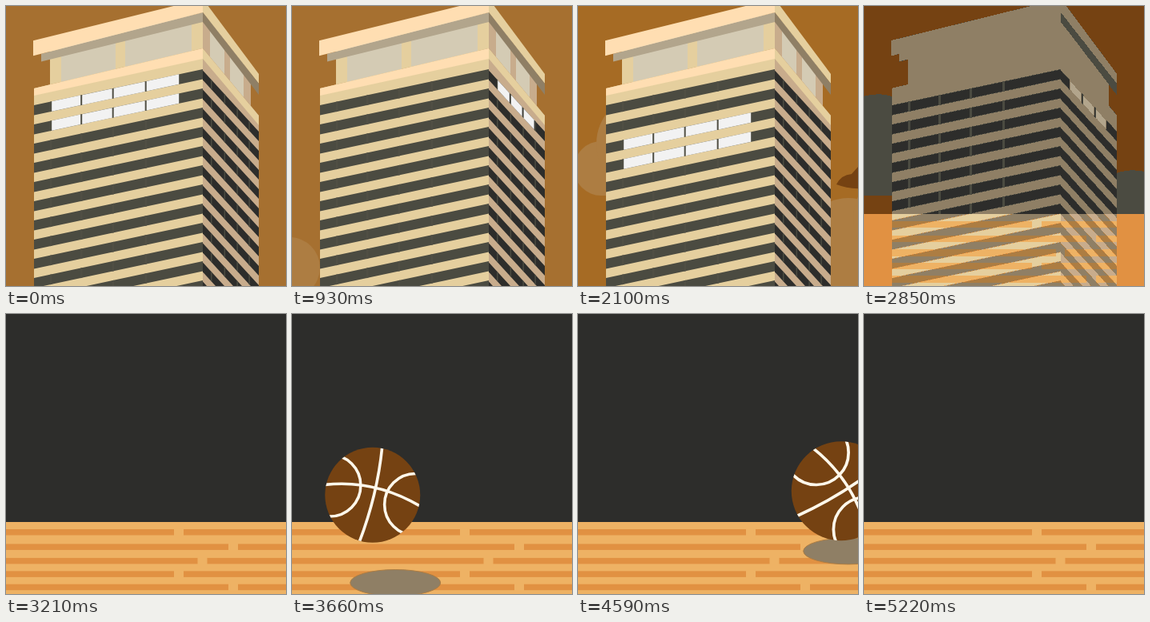
Animation of 350 by 350 pixels, one loop 5.37 s. Source, as an HTML page with a canvas:

```html
<!DOCTYPE html>
<html lang="en">
<head>
<meta charset="utf-8">
<title>Tower and ball</title>
<style>
html, body { margin: 0; width: 100%; height: 100%; overflow: hidden; background: #2d2d2b; }
canvas { display: block; width: 100vw; height: 100vh; }
</style>
</head>
<body>
<canvas id="stage" width="350" height="350"></canvas>
<script>
const ctx = document.getElementById('stage').getContext('2d', { willReadFrequently: true });
const LOOP = 5370, STEP = 30, SIZE = 350;
const FADE_START = 2600, FADE_TIME = 510;
const BALL_START = 3230, BALL_END = 4890;
const DRIFT = 0.09, ROW_PITCH = 24;

const C = {
  night: '#2d2d2b', slate: '#4b4b41', brown: '#754212', sky: '#a66b24',
  cloud: '#ad7d42', stone: '#8f7f65', under: '#b2a58c', side: '#c8ac8c',
  glass: '#d4cbb4', wall: '#e5cf9e', peach: '#ffdeb2', lit: '#f2f2f2',
  plank: '#e19142', floor: '#eeb264', seam: '#fff8eb'
};
const MULLION = '#504f44', EARLY_SKY = '#a67030';
const palette = Object.values(C).map(c => [1, 3, 5].map(i => parseInt(c.slice(i, i + 2), 16)));

function disc(color, x, y, rx, ry = rx) {
  ctx.fillStyle = color;
  ctx.beginPath();
  ctx.ellipse(x, y, rx, ry, 0, 0, Math.PI * 2);
  ctx.fill();
}

function rect(color, x, y, w, h) {
  ctx.fillStyle = color;
  ctx.fillRect(x, y, w, h);
}

function drawBird(x, y) {
  ctx.fillStyle = C.brown;
  ctx.beginPath();
  ctx.moveTo(x, y);
  ctx.quadraticCurveTo(x + 6, y - 12, x + 19, y - 13);
  ctx.lineTo(x + 45, y - 42);
  ctx.lineTo(x + 45, y - 8);
  ctx.lineTo(x + 75, y);
  ctx.quadraticCurveTo(x + 28, y + 11, x, y);
  ctx.fill();
}

function drawSky(t) {
  rect(t < 1300 ? EARLY_SKY : C.sky, 0, 0, SIZE, SIZE);
  const left = (2100 - t) * DRIFT;
  if (t > 560) disc(C.cloud, -3 + (t - 930) * 0.103, 327, 38);
  if (t > 1700) {
    disc(C.cloud, 29 + left, 203, 34);
    disc(C.cloud, 85 + left, 172, 62);
    rect(C.cloud, 29 + left, 203, 120, 34);
  }
  disc(C.cloud, 338 + left, 300, 60);
  disc(C.cloud, 404 + left, 265, 60);
  rect(C.cloud, 278 + left, 300, 200, 50);
  if (t > 1900) drawBird(323 - (t - 2100) * 0.18, 223);
}

// Each face maps a pair of edge heights to a sloping line across it.
const front = { x0: 35, x1: 246 };
const side = { x0: 246, x1: 316 };

function band(face, color, top, bottom, from = face.x0, to = face.x1) {
  const at = ([a, b], x) => a + (b - a) * (x - face.x0) / (face.x1 - face.x0);
  ctx.fillStyle = color;
  ctx.beginPath();
  ctx.moveTo(from, at(top, from));
  ctx.lineTo(to, at(top, to));
  ctx.lineTo(to, at(bottom, to));
  ctx.lineTo(from, at(bottom, from));
  ctx.fill();
}

function windows(face, color, row, from, to) {
  const y = row * ROW_PITCH;
  const [a, b] = face === front ? [124, 79] : [80.5, 157];
  const h = face === front ? 12.5 : 12;
  band(face, color, [a + y, b + y], [a + y + h, b + y + h], from, to);
}

const frontCol = i => 56 + 37.25 * i + 0.75 * i * i;
const sideCol = i => 256 + 17 * i - 0.4 * i * i;

function light(face, row, col, count) {
  for (let i = 0; i < count; i++) windows(face, C.lit, row, col(i) + 1.2, col(i + 1) - 0.8);
}

function drawRoof() {
  band(front, C.wall, [60, 8], [103, 53], 55);
  band(front, C.glass, [60, 8], [103, 53], 69, 137);
  band(front, C.glass, [60, 8], [103, 53], 149, 232);
  band(side, C.side, [8, 97], [53, 137], 246, 306);
  band(side, C.glass, [8, 97], [53, 137], 255, 273);
  band(side, C.glass, [8, 97], [53, 137], 280, 297);
  band(front, C.under, [62, 8], [71.7, 20], 44);
  band(front, C.peach, [43, -9], [62, 8], 34);
  band(side, C.wall, [-9, 85], [8, 97]);
  band(side, C.stone, [8, 97], [20, 111]);
}

function drawTower(t) {
  drawRoof();
  band(front, C.wall, [103, 53], [SIZE, SIZE]);
  band(front, C.peach, [103, 53], [112, 66]);
  band(side, C.side, [53, 137], [SIZE, SIZE]);
  band(side, C.wall, [53, 137], [66, 149]);

  for (let row = 0; row < 12; row++) {
    windows(front, C.slate, row);
    windows(side, C.night, row);
    for (let i = 0; i < 4; i++) {
      windows(front, MULLION, row, frontCol(i) - 1, frontCol(i) + 1.5);
      windows(side, C.slate, row, sideCol(i), sideCol(i) + 1.5);
    }
  }

  // lights alternate between the two faces
  const phase = Math.floor(t / 800);
  if (phase % 2) {
    light(side, 0, sideCol, 3);
  } else {
    light(front, phase, frontCol, 4);
    light(front, phase + 1, frontCol, 4);
  }
}

function drawCourt() {
  rect(C.night, 0, 0, SIZE, 260);
  rect(C.floor, 0, 260, SIZE, 90);
  for (let i = 0; i < 5; i++) {
    const y = 269 + 17.4 * i + 1.2 * Math.sin(i);
    const gap = [210, 278, 239.5][i % 3];
    rect(C.plank, 0, y, gap, 7.5);
    rect(C.plank, gap + 12, y, SIZE, 7.5);
  }
}

// Each hop: start time and x, speed, then apex height, apex time and fall rate.
const hops = [
  { t: 3230, x: -100, v: 0.52, top: 165, apex: 3250, g: 0.001054 },
  { t: 3580, x: 83, v: 0.222, top: 135, apex: 3968, g: 0.000962 },
  { t: 4335, x: 251, v: 0.305, top: 213, apex: 4760, g: 0.000286 }
];

function drawBall(t) {
  const hop = hops.filter(h => h.t <= t).pop();
  const x = hop.x + hop.v * (t - hop.t);
  const y = hop.top + hop.g * (t - hop.apex) ** 2;
  const r = Math.min(62, 59.5 + (t - 3660) * 0.0046);
  const ground = 336 - (t - 3660) * 0.0426;
  const lift = Math.max(0, ground - 58 - y);

  disc(C.stone, x + lift * 0.55, ground, 56.5, 16.5);
  ctx.strokeStyle = C.cloud;
  ctx.lineWidth = 1;
  ctx.stroke();

  disc(C.brown, x, y, r);
  ctx.save();
  ctx.clip();
  ctx.translate(x, y);
  ctx.rotate((t - 3660) / 540 * 235 * Math.PI / 180);
  ctx.scale(r / 60, r / 60);
  ctx.strokeStyle = C.seam;
  ctx.lineWidth = 3.6;
  ctx.beginPath();
  ctx.moveTo(-60, -13);
  ctx.quadraticCurveTo(2, -20, 60, 14);
  ctx.moveTo(12, -60);
  ctx.quadraticCurveTo(6, 0, -17, 60);
  for (const s of [-1, 1]) {
    ctx.moveTo(s * 54 + 39, s * 12);
    ctx.arc(s * 54, s * 12, 39, 0, Math.PI * 2);
  }
  ctx.stroke();
  ctx.restore();
}

// Snap blended colours to the flat palette.
const snapped = new Map();
function nearest(r, g, b) {
  const key = r << 16 | g << 8 | b;
  if (!snapped.has(key)) {
    const dist = c => (c[0] - r) ** 2 + (c[1] - g) ** 2 + (c[2] - b) ** 2;
    snapped.set(key, palette.reduce((best, c) => dist(c) < dist(best) ? c : best));
  }
  return snapped.get(key);
}

function posterize() {
  const img = ctx.getImageData(0, 0, SIZE, SIZE), d = img.data;
  for (let i = 0; i < d.length; i += 4) {
    const c = nearest(d[i], d[i + 1], d[i + 2]);
    d[i] = c[0];
    d[i + 1] = c[1];
    d[i + 2] = c[2];
  }
  ctx.putImageData(img, 0, 0);
}

function draw(t) {
  const fade = Math.max(0, Math.min(1, (t - FADE_START) / FADE_TIME));
  if (fade < 1) {
    drawSky(t);
    drawTower(t);
  }
  if (fade > 0) {
    ctx.globalAlpha = fade;
    drawCourt();
    ctx.globalAlpha = 1;
    if (fade < 1) posterize();
  }
  if (t >= BALL_START && t < BALL_END) drawBall(t);
}

let start = null;
function tick(now) {
  if (start === null) start = now;
  draw(Math.floor((now - start) % LOOP / STEP) * STEP);
  requestAnimationFrame(tick);
}
draw(0);
requestAnimationFrame(tick);
</script>
</body>
</html>
```
